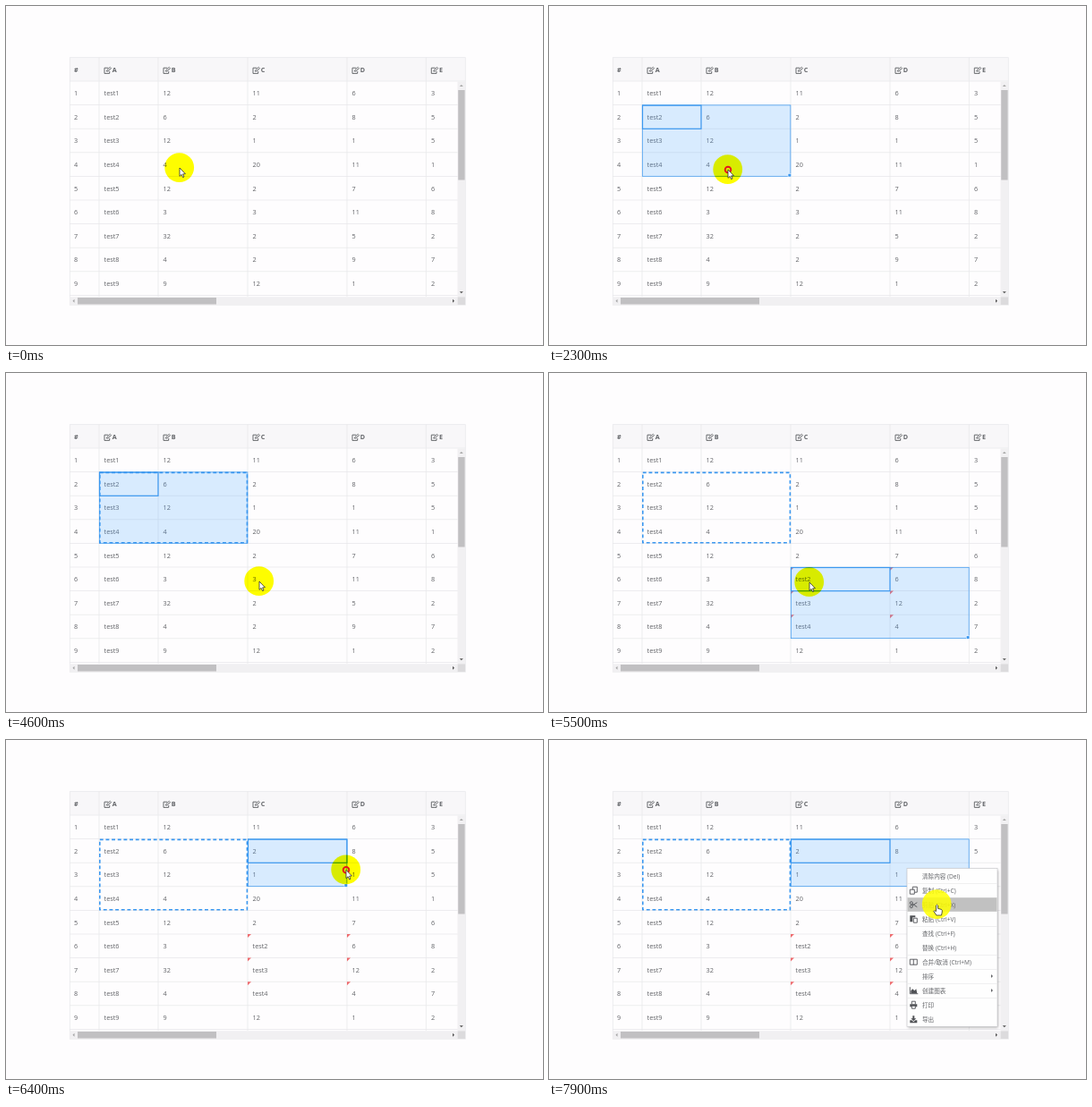
An HTML page with a canvas that plays this animation: 600 by 379 pixels, repeating every 8000 ms.

```html
<!DOCTYPE html>
<html lang="zh">
<head>
<meta charset="utf-8">
<style>
  html, body { margin: 0; width: 100%; height: 100%; overflow: hidden; background: #fefdfe; }
  canvas { display: block; width: 600px; height: 379px; }
</style>
</head>
<body>
<canvas></canvas>
<script>
const LOOP = 8000, STEP = 100;
const COPY_AT = 3500, PASTE_AT = 5400, MENU_AT = 6900;
const FONT = '"Open Sans", "Noto Sans CJK SC", "Noto Sans CJK", sans-serif';
const PAGE = '#fefdfe', BLUE = '#3b98f0', LINE = '#e9e9ec', INK = '#606266';

const canvas = document.querySelector('canvas');
const ctx = canvas.getContext('2d');
const dpr = window.devicePixelRatio || 1;
canvas.width = 600 * dpr;
canvas.height = 379 * dpr;

const ROW = 26.6, LAST_ROW = 9, TOP = 84;
const colX = [71, 104, 170, 270, 381, 469.3, 513];
const rowY = row => TOP + (row - 1) * ROW;
const contents = {
  B: '12 6 12 4 12 3 32 4 9', C: '11 2 1 20 2 3 2 2 12',
  D: '6 8 1 11 7 11 5 9 1', E: '3 5 5 1 6 8 2 7 2',
};
const grid = [
  Array.from({ length: LAST_ROW }, (_, i) => i + 1),
  Array.from({ length: LAST_ROW }, (_, i) => 'test' + (i + 1)),
  ...Object.values(contents).map(list => list.split(' ')),
];
// The copied block keeps its size and lands at another cell
const copied = { col: 1, row: 2, cols: 2, rows: 3 };
const target = { col: 3, row: 6 };

// The pointer eases from stop to stop
const stops = [
  { t: 100, x: 194, y: 181 },
  { t: 600, x: 334, y: 350 },
  { t: 900, x: 141, y: 141 },
  { t: 1300, x: 166, y: 148 },
  { t: 1700, x: 138, y: 127 },
  { t: 1900, x: 138, y: 127 },
  { t: 2300, x: 200, y: 183 },
  { t: 3500, x: 200, y: 183 },
  { t: 4600, x: 283, y: 233 },
  { t: 5500, x: 291, y: 234 },
  { t: 6200, x: 325, y: 124 },
  { t: 6400, x: 380, y: 145.3 },
  { t: 6700, x: 400, y: 143.5 },
  { t: 6900, x: 400, y: 143.5 },
  { t: 7400, x: 432, y: 294 },
  { t: 7900, x: 433.5, y: 184 },
];
const presses = [
  { from: 1800, to: 2900 },
  { from: 4900, to: 5000 },
  { from: 6200, to: 6600 },
  { from: 6800, to: 6900, secondary: true },
];

const menu = { x: 400, y: 143.5, width: 101, row: 16 };
const menuGroups = [
  ['清除内容 (Del)'], ['复制 (Ctrl+C)', '剪贴 (Ctrl+X)', '粘贴 (Ctrl+V)'],
  ['查找 (Ctrl+F)', '替换 (Ctrl+H)'], ['合并/取消 (Ctrl+M)'], ['排序'], ['创建图表'], ['打印', '导出'],
];
const submenus = ['排序', '创建图表'];
// Icons in an 8 by 8 box
const icons = {
  复制: { line: 'M0 3H5V8H0ZM3 3V0H8V6H5' },
  剪贴: { line: 'M2.5 3L8 6.5M2.5 5L8 1.5M3 2A1 1 0 1 0 0 2A1 1 0 1 0 3 2M3 6A1 1 0 1 0 0 6A1 1 0 1 0 3 6' },
  粘贴: { line: 'M4 3H8V8H4Z', solid: 'M0 0H6V2H3V7H0Z' },
  合并: { line: 'M0 1H8V7H0ZM4 1V7' },
  创建: { line: 'M0 0V7.5H9', solid: 'M1 7V4L3 2L5 4L7 2L8 7Z' },
  打印: { line: 'M2 3V0H6V3M2 5H6V8H2Z', solid: 'M0 3H8V6H6V5H2V6H0Z' },
  导出: { solid: 'M3 0H5V3H7L4 6L1 3H3ZM0 5H2L4 7L6 5H8V8H0Z' },
};
const editIcon = 'M6.2 5V7.4H.5V1.2H4.8M3 5.1L3.3 3.7L6.8 .4L8 1.6L4.4 5Z';
const arrowPointer = 'M0 0V9.3L2.1 7.4L3.6 10.6L5 10L3.6 6.9L6.4 6.7Z';
const handPointer = 'M-1 1Q0 -.8 1 1V4.4L5 5.4Q6 6 5.8 8L5 12H-.6L-3.6 7.5Q-3.6 6 -1 7.5Z';

function rect(x, y, w, h, color) {
  ctx.fillStyle = color;
  ctx.fillRect(x, y, w, h);
}

function frame(x, y, w, h, color, width) {
  ctx.strokeStyle = color;
  ctx.lineWidth = width;
  ctx.strokeRect(x, y, w, h);
}

function text(value, x, y, size = 7.3, weight = 400) {
  ctx.font = `${weight} ${size}px ${FONT}`;
  ctx.fillStyle = INK;
  ctx.fillText(value, x, y + size * 0.36);
}

function shape(d, x, y, { fill, stroke, width = 0.8, angle = 0 }) {
  const outline = new Path2D(d);
  ctx.save();
  ctx.translate(x, y);
  ctx.rotate(angle);
  if (fill) { ctx.fillStyle = fill; ctx.fill(outline); }
  if (stroke) { ctx.strokeStyle = stroke; ctx.lineWidth = width; ctx.stroke(outline); }
  ctx.restore();
}

function triangle(x, y, quarterTurns, color) {
  shape('M-1 -2L1 0L-1 2Z', x, y, { fill: color, angle: quarterTurns * Math.PI / 2 });
}

function disc(x, y, radius) {
  ctx.beginPath();
  ctx.arc(x, y, radius, 0, Math.PI * 2);
}

function pointerAt(t) {
  const i = stops.findIndex(stop => stop.t >= t);
  if (i <= 0) return stops[0];
  const a = stops[i - 1], b = stops[i];
  const k = (t - a.t) / (b.t - a.t);
  const eased = k * k * (3 - 2 * k);
  return { x: a.x + (b.x - a.x) * eased, y: a.y + (b.y - a.y) * eased };
}

function cellAt({ x, y }) {
  return { col: colX.findLastIndex(left => left <= x), row: Math.floor((y - TOP) / ROW) + 1 };
}

function inPastedBlock(col, row) {
  const dc = col - target.col, dr = row - target.row;
  return dc >= 0 && dc < copied.cols && dr >= 0 && dr < copied.rows;
}

function cellValue(col, row) {
  return grid[col][row - 1];
}

function drawTable(pasted) {
  rect(71, 57.5, 442, 26.5, '#f8f7f9');
  for (let row = 1; row <= LAST_ROW + 1; row++) rect(71, rowY(row) - 0.4, 442, 0.8, LINE);
  for (const x of colX.slice(1, -1)) rect(x - 0.4, 57.5, 0.8, 267.5, LINE);
  frame(71.3, 57.7, 442, 276.5, LINE, 0.8);

  text('#', 76, 71.8, 7.2, 700);
  [...'ABCDE'].forEach((name, i) => {
    const x = colX[i + 1] + 5.5;
    shape(editIcon, x, 68, { stroke: INK, width: 0.95 });
    text(name, x + 9.2, 71.8, 7.2, 700);
  });
  for (let row = 1; row <= LAST_ROW; row++)
    for (let col = 0; col < grid.length; col++) {
      const x = colX[col], y = rowY(row);
      const fresh = pasted && inPastedBlock(col, row);
      const value = fresh
        ? cellValue(col - target.col + copied.col, row - target.row + copied.row)
        : cellValue(col, row);
      text(value, x + (col ? 5.6 : 5), y + 13.5);
      if (fresh) shape('M0 0H4L0 4Z', x, y, { fill: '#ee6b6e' });
    }
}

function drawScrollbars() {
  rect(504.5, 84.4, 8.6, 240.6, '#f1f0f2');
  rect(505.2, 94, 7.4, 100.5, '#c1c0c2');
  rect(71.5, 325.3, 433, 8.7, '#f1f0f2');
  rect(80, 326, 155, 7.5, '#c1c0c2');
  rect(504.5, 325.3, 8.6, 8.7, '#dcdbdd');
  triangle(508.8, 89, -1, '#a3a3a3');
  triangle(508.8, 320.3, 1, '#505050');
  triangle(75.5, 329.8, 2, '#a3a3a3');
  triangle(500, 329.8, 0, '#505050');
}

// The range runs from the pressed cell to the cell under the pointer
function drawSelection(t) {
  const press = presses.findLast(p => p.from <= t && !p.secondary);
  if (!press) return;
  const start = cellAt(pointerAt(press.from));
  const end = cellAt(pointerAt(Math.min(t, press.to)));
  if (t >= PASTE_AT && inPastedBlock(start.col, start.row)) {
    end.col = start.col + copied.cols - 1;
    end.row = start.row + copied.rows - 1;
  }
  const x = colX[start.col], y = rowY(start.row);
  const right = colX[end.col + 1], bottom = rowY(end.row + 1);
  rect(x, y, right - x, bottom - y, 'rgba(64,158,255,.2)');
  frame(x + 0.3, y + 0.3, right - x - 0.4, bottom - y - 0.4, BLUE, 0.7);
  frame(x + 0.5, y + 0.5, colX[start.col + 1] - x - 0.5, ROW - 0.4, BLUE, 1.2);
  if (t < COPY_AT || press.from > COPY_AT) {
    rect(right - 3.2, bottom - 3.2, 4, 4, PAGE);
    rect(right - 2.7, bottom - 2.7, 3, 3, BLUE);
  }
}

function drawMarchingBorder(t) {
  const { col, row, cols, rows } = copied;
  ctx.setLineDash([3.9, 2.76]);
  ctx.lineDashOffset = -(t - STEP) / 300 * 6.66;
  frame(colX[col] + 0.8, rowY(row) + 0.8, colX[col + cols] - colX[col] - 1.4, rows * ROW - 1.5, BLUE, 1.6);
  ctx.setLineDash([]);
}

function drawMenu(hovered) {
  const { x, y, width, row } = menu;
  const height = menuGroups.flat().length * row + 1;
  ctx.save();
  ctx.shadowColor = 'rgba(0,0,0,.35)';
  ctx.shadowBlur = 3 * dpr;
  ctx.shadowOffsetX = ctx.shadowOffsetY = 1.2 * dpr;
  rect(x, y, width, height, '#fefefe');
  ctx.restore();
  frame(x, y, width, height, '#c4c4c6', 0.6);
  if (hovered >= 0) rect(x + 0.5, y + 0.7 + hovered * row, width - 1, row - 0.4, '#c1c1c1');

  let top = y + 0.5;
  for (const group of menuGroups) {
    if (group !== menuGroups[0]) rect(x + 0.5, top, width - 1, 0.6, '#e6e6e8');
    for (const label of group) {
      const middle = top + 8.2;
      text(label, x + 17, middle, 6.6);
      const icon = icons[label.slice(0, 2)];
      if (icon?.line) shape(icon.line, x + 3.3, middle - 4, { stroke: '#505256', width: 0.9 });
      if (icon?.solid) shape(icon.solid, x + 3.3, middle - 4, { fill: '#505256' });
      if (submenus.includes(label)) triangle(x + 95, middle - 0.3, 0, INK);
      top += row;
    }
  }
}

function drawPointer({ x, y }, t, overMenu) {
  ctx.save();
  if (overMenu) ctx.globalAlpha = 0.85;
  else ctx.globalCompositeOperation = 'multiply';
  ctx.fillStyle = '#ff0';
  disc(x - 0.3, y - 0.4, 16.4);
  ctx.fill();
  ctx.restore();

  const press = presses.find(p => t >= p.from && t <= p.to);
  if (press) {
    ctx.globalAlpha = t === press.to ? 0.5 : 1;
    ctx.strokeStyle = '#e8141c';
    ctx.lineWidth = 1.9;
    disc(x, y, 3.3);
    ctx.stroke();
    ctx.globalAlpha = 1;
  }
  shape(overMenu ? handPointer : arrowPointer, x, y, { fill: '#fff', stroke: '#222', width: 0.75 });
}

function draw(t) {
  ctx.setTransform(dpr, 0, 0, dpr, 0, 0);
  rect(0, 0, 600, 379, PAGE);
  drawTable(t >= PASTE_AT);
  drawSelection(t);
  if (t >= COPY_AT) drawMarchingBorder(t);
  drawScrollbars();
  const pointer = pointerAt(t);
  const menuOpen = t >= MENU_AT;
  const overMenu = menuOpen && pointer.x > menu.x;
  if (menuOpen) drawMenu(overMenu ? Math.floor((pointer.y - menu.y) / menu.row) : -1);
  drawPointer(pointer, t, overMenu);
}

function tick() {
  draw(Math.floor(performance.now() % LOOP / STEP) * STEP);
  requestAnimationFrame(tick);
}
tick();
</script>
</body>
</html>
```
